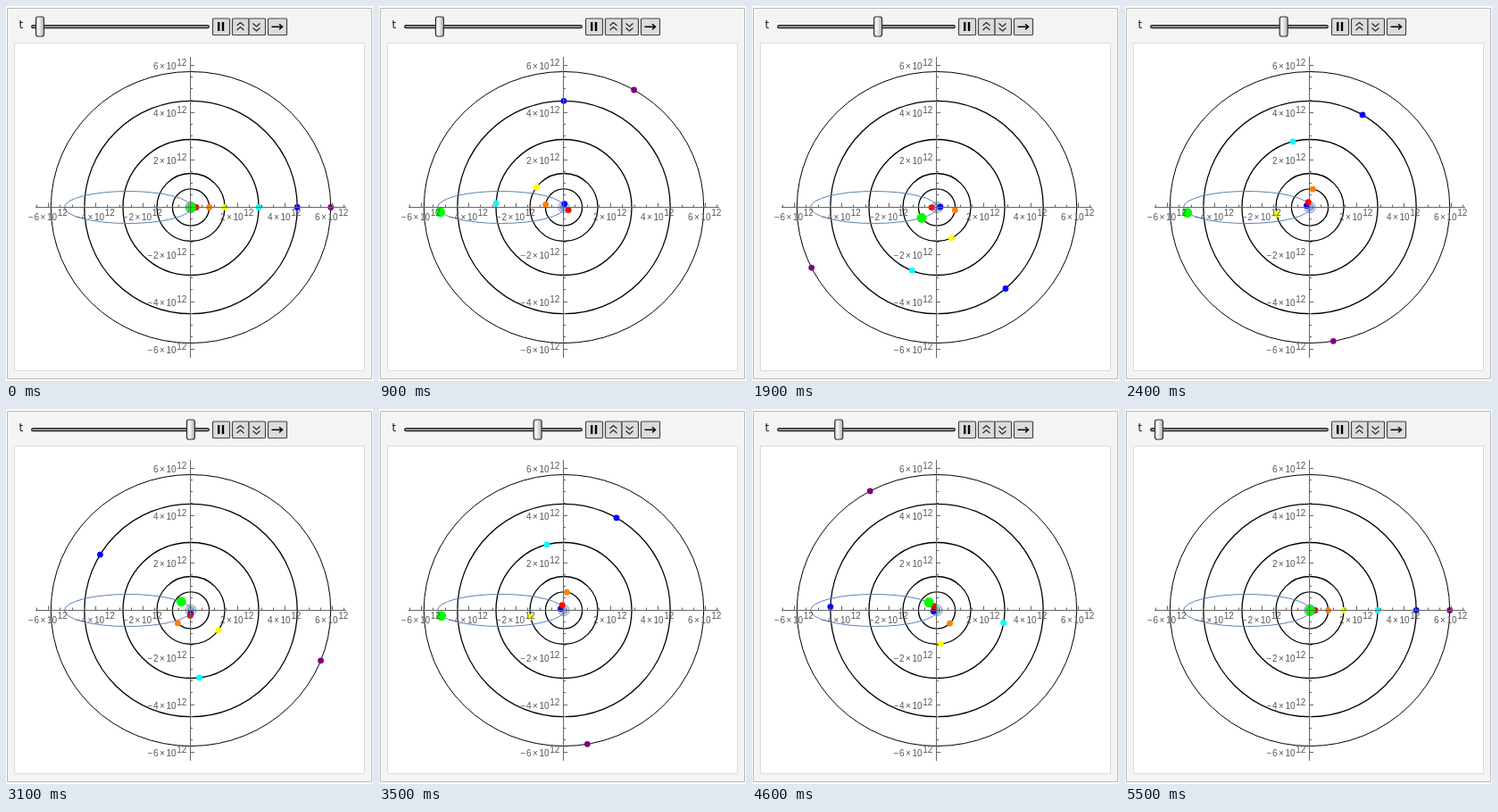
Animation, 411 px wide and 420 px high, one loop 6 s. Source, as an HTML page with a canvas:

```html
<!DOCTYPE html>
<html>
<head>
<meta charset="utf-8">
<style>
html, body { margin: 0; width: 100%; height: 100%; overflow: hidden; background: #fff; }
canvas { display: block; }
</style>
</head>
<body>
<canvas id="stage" width="411" height="420"></canvas>
<script>
const ctx = document.getElementById('stage').getContext('2d');
const CX = 207, CY = 225.5, UNIT = 26.5; // pixels per 10^12 m
const TAU = 2 * Math.PI, SPAN = 248;     // years covered by the slider

// Period in years, semi-axes and centre offset in pixels.
const bodies = [
  { period: 0.2408, rx: 1.5, thin: true },
  { period: 0.6152, rx: 2.9, thin: true },
  { period: 1, rx: 4, thin: true, color: '#00f' },
  { period: 1.881, rx: 6, thin: true, color: '#f00' },
  { period: 11.86, rx: 20.6, color: '#ff8000' },
  { period: 29.46, rx: 38, color: '#ff0' },
  { period: 84.02, rx: 76, color: '#0ff' },
  { period: 164.8, rx: 119.2, color: '#00f' },
  { period: 247.7, rx: 156.7, ry: 152, width: 1, color: '#800080' },
  { period: 75.3, rx: 71, ry: 18, dx: -70.5, thin: true, color: '#0f0', size: 5.5 }
];

function yearAt(ms) {
  const step = Math.floor((ms - 500) / 100);
  if (step < 0 || step > 49) return 0;
  return 0.9 + 10.08 * Math.min(step, 49 - step);
}

function line(points, color, width) {
  ctx.beginPath();
  points.forEach(([x, y]) => ctx.lineTo(x, y));
  ctx.strokeStyle = color;
  ctx.lineWidth = width;
  ctx.stroke();
}

function box(x, y, w, h, radius, fill, stroke, width = 1) {
  ctx.beginPath();
  ctx.roundRect(x, y, w, h, radius);
  ctx.fillStyle = fill;
  ctx.fill();
  ctx.strokeStyle = stroke;
  ctx.lineWidth = width;
  ctx.stroke();
}

function text(s, x, y, font, color) {
  ctx.font = font;
  ctx.fillStyle = color;
  ctx.fillText(s, x, y);
}

function drawControls(year) {
  text('t', 14.5, 25, '12px "DejaVu Sans", sans-serif', '#201020');
  box(28.7, 21.7, 198.6, 3, 1.5, '#999', '#222', 1.3);

  const x = 38 + year * 180 / SPAN;
  const shade = ctx.createLinearGradient(x - 5, 0, x + 5, 0);
  shade.addColorStop(0, '#c4c4c4');
  shade.addColorStop(0.35, '#f8f8f8');
  shade.addColorStop(1, '#aaa');
  box(x - 4.5, 12, 9, 22, 2.5, shade, '#333', 1.2);

  for (const [left, w] of [[231.5, 19], [253.5, 18.5], [272, 18.5], [293.5, 21]])
    box(left, 14, w, 18.5, 1, '#dcdcdc', '#444', 1.2);
  ctx.fillStyle = '#000';
  ctx.fillRect(237, 18, 2.4, 10);
  ctx.fillRect(241.8, 18, 2.4, 10);
  for (const y of [22, 27]) line([[258.5, y], [262.5, y - 3.5], [266.5, y]], '#222', 1.1);
  for (const y of [19.5, 24.5]) line([[276.5, y], [280.5, y + 3.5], [284.5, y]], '#222', 1.1);
  line([[297.5, 23.3], [309, 23.3]], '#000', 1.5);
  line([[306, 20.3], [309.5, 23.3], [306, 26.3]], '#000', 1.5);
}

function label(n, right, base) {
  const font = '10px "Liberation Sans", Arial, sans-serif', color = '#555';
  text('12', right - 11.2, base - 4.5, font, color);
  text('10', right - 23, base, font, color);
  text('×', right - 30.5, base, font, color);
  text(Math.abs(n), right - 37.5, base, font, color);
  if (n < 0) text('−', right - 44, base, font, color);
}

function drawAxes() {
  const color = '#666';
  line([[33, CY], [381, CY]], color, 1);
  line([[CX - 0.5, 57], [CX - 0.5, 394]], color, 1);
  for (let i = -13; i <= 13; i++) {
    const offset = i * UNIT / 2, major = i % 4 === 0;
    const length = major ? 5 : 3;
    const x = Math.round(CX + offset) - 0.5, y = Math.round(CY - offset) - 0.5;
    line([[x, CY], [x, CY - length]], color, 1);
    if (Math.abs(i) < 13) line([[CX, y], [CX + length - 1, y]], color, 1);
    if (major && i) {
      label(i / 2, 202.5, y + 4.5);
      label(i / 2, CX + offset + (i < 0 ? 21 : 17.5), 239.5);
    }
  }
}

function drawSystem(year) {
  for (const { rx, ry = rx, dx = 0, thin, width = 1.3 } of bodies) {
    ctx.beginPath();
    ctx.ellipse(CX + dx, CY, rx, ry, 0, 0, TAU);
    ctx.strokeStyle = thin ? '#5e81b5' : '#000';
    ctx.lineWidth = thin ? 1 : width;
    ctx.stroke();
  }
  for (const { period, rx, ry = rx, dx = 0, color, size = 3.4 } of bodies) {
    if (!color) continue;
    const angle = TAU * year / period;
    ctx.beginPath();
    ctx.arc(CX + dx + rx * Math.cos(angle), CY - ry * Math.sin(angle), size, 0, TAU);
    ctx.fillStyle = color;
    ctx.fill();
  }
}

function draw() {
  const year = yearAt(performance.now() % 6000);
  ctx.fillStyle = '#fff';
  ctx.fillRect(0, 0, 411, 420);
  box(1.5, 2.5, 408, 415, 0, '#f4f4f4', '#b8b8b8');
  box(9.5, 41.5, 392, 367, 0, '#fff', '#dcdcdc');
  drawControls(year);
  drawSystem(year);
  drawAxes();
  requestAnimationFrame(draw);
}
draw();
</script>
</body>
</html>
```
